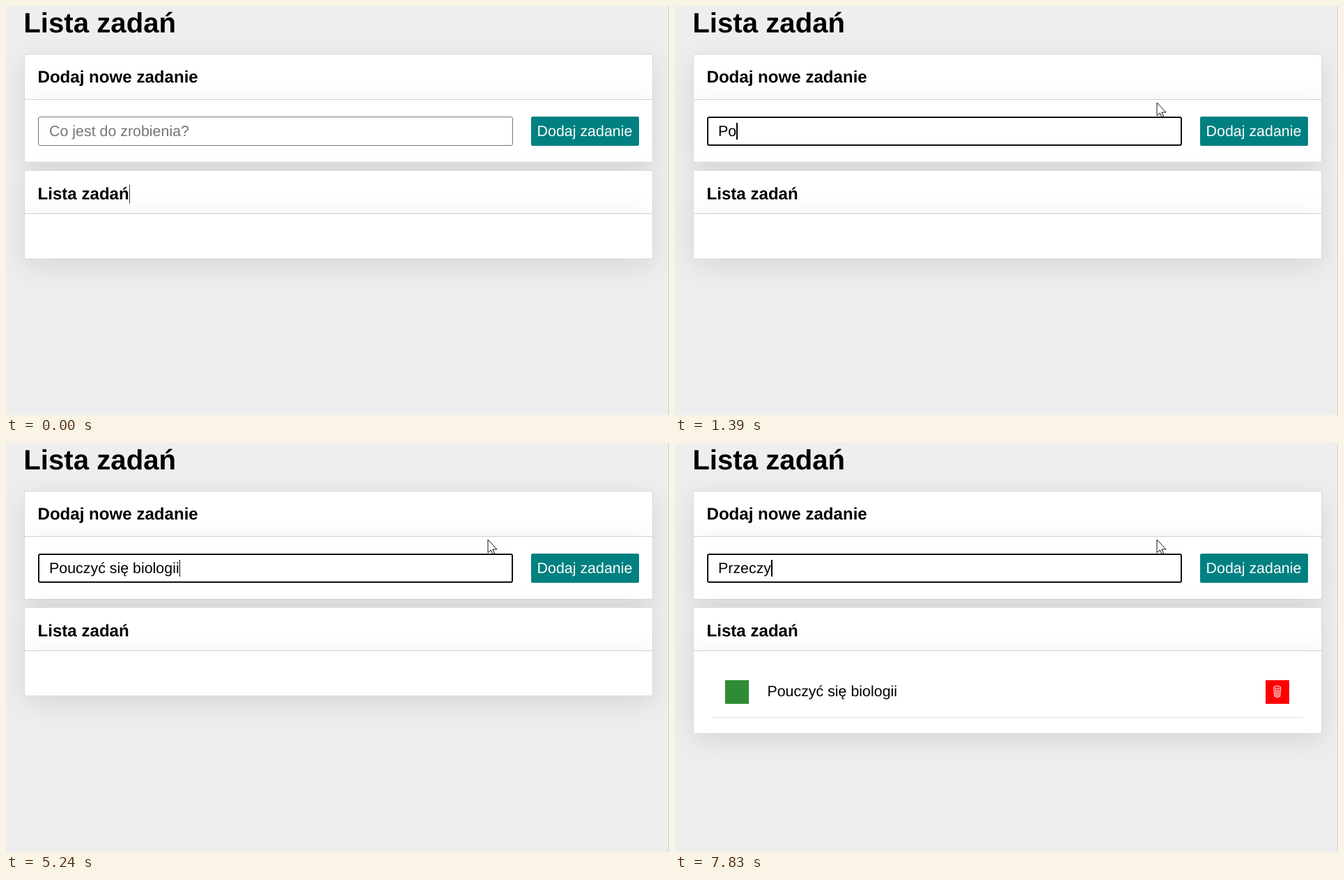
Write an HTML page that moves like this. It is 952 px wide and 588 px high and loops after 8000 ms.

```html
<!DOCTYPE html>
<html lang="pl">
<head>
<meta charset="utf-8">
<title>Lista zadań</title>
<style>
  html, body { margin: 0; width: 100%; height: 100%; overflow: hidden; }
  body {
    position: relative; background: #eee; color: #000;
    font: 21.4px/24px "Liberation Sans", Arial, sans-serif;
    text-rendering: geometricPrecision;
  }
  body *, svg { position: absolute; box-sizing: border-box; margin: 0; white-space: pre; }
  h1 { left: 25.3px; top: 2px; font-size: 40.2px; line-height: 45px; }
  h2 { left: 45.5px; font-size: 24.1px; line-height: 27px; }
  .box {
    left: 25.5px; width: 903.5px; background: #fff;
    border: 1px solid #dcdcdc; box-shadow: 0 10px 40px rgba(0, 0, 0, .1);
  }
  .head { border-bottom: 0; }
  .body { border-top: 1.5px solid #d0d0d0; }
  #field { left: 45.5px; top: 158.5px; width: 682px; height: 42.5px; border: 1px solid #767676; border-radius: 3px; background: #fff; }
  #field.focus { border: 2px solid #101010; }
  .line { left: 62px; top: 168px; }
  .line span { position: static; }
  #hint { color: #757575; }
  #caret { width: 1.5px; height: 24px; background: #000; }
  #button { left: 753.5px; top: 159px; width: 155px; height: 42px; border-radius: 2px; background: #008080; }
  #label { left: 762.6px; top: 168px; color: #fff; }
  #mark { left: 176.5px; top: 257px; width: 1.3px; height: 27px; background: #333; }
  #done { left: 72px; top: 341px; width: 34px; height: 33.5px; background: #2e8b36; }
  #task { left: 132.4px; top: 345px; }
  #bin { left: 848px; top: 341px; width: 34px; height: 33.5px; background: #f00; }
  #rule { left: 54px; top: 394px; width: 847px; height: 1px; background: #e2e2e2; }
  #edge { right: 0; top: 0; width: 1px; height: 100%; background: #cfcfcf; }
  svg { left: 0; top: 0; overflow: visible; }
</style>
</head>
<body>
  <h1>Lista zadań</h1>

  <div class="box head" style="top:69px;height:65px"></div>
  <div class="box body" style="top:134px;height:90.5px"></div>
  <div class="box head" style="top:236px;height:62px"></div>
  <div class="box body" id="list" style="top:297.5px"></div>

  <h2 style="top:89px">Dodaj nowe zadanie</h2>
  <div id="field"></div>
  <div class="line" id="hint">Co jest do zrobienia?</div>
  <div class="line"><span id="typed"></span><i id="caret"></i></div>
  <div id="button"></div>
  <div id="label">Dodaj zadanie</div>

  <h2 style="top:257px">Lista zadań</h2>
  <div id="mark"></div>

  <div id="item">
    <div id="done"></div>
    <div id="task">Pouczyć się biologii</div>
    <div id="bin">
      <svg width="34" height="34" fill="none" stroke="#fff" stroke-width="1">
        <ellipse cx="16.8" cy="10" rx="5" ry="1.7"/>
        <path d="M11.8 10.5 L13 23.5 Q16.8 25.5 20.6 23.5 L21.8 10.5 M14.3 13 L14.9 23 M16.8 13 V23.5 M19.3 13 L18.7 23"/>
      </svg>
    </div>
    <div id="rule"></div>
  </div>
  <div id="edge"></div>

  <svg width="952" height="588">
    <circle id="glow" cx="687" cy="176" r="14.5" fill="#ffff80" style="mix-blend-mode:multiply"/>
    <g id="pointer">
      <path id="arrow" d="M.5 .5 V19.3 L4.8 15.4 L7.5 21.2 L10 20.1 L7.4 14.4 H13.6 Z" fill="#fff" stroke="#111" stroke-width="1"/>
      <path id="beam" d="M-5 -9.5 H-1.5 L0 -8.5 L1.5 -9.5 H6 M0 -8.5 V8.5 M-5 9.5 H-1.5 L0 8.5 L1.5 9.5 H6" fill="none" stroke="#222" stroke-width="1.3"/>
    </g>
  </svg>

<script>
  const LOOP = 8000, FOCUS = 460, BLINK = 1060, ADDED = 5640;
  const FIRST = "Pouczyć się biologii", SECOND = "Przeczy";

  // [time, typed text]
  const typing = [[0, ""]];
  const type = (text, times, from = 1) =>
    times.forEach((t, i) => typing.push([t, text.slice(0, from + i)]));
  type(FIRST, [1230, 1390, 1720]);
  type(FIRST, [1915], 5);
  type(FIRST, [2110, 2570, 2780, 2940, 3100, 3370, 3570, 3770, 3930, 4090, 4250, 4450, 4920, 5080, 5240], 6);
  typing.push([ADDED, ""]);
  type(SECOND, [6170, 6500, 6735, 6970, 7205, 7440, 7830]);

  // [time, x, y, shape]
  const moves = [
    [0, 0, 0, ""],
    [120, 884, 190, "arrow"], [190, 850, 188, "arrow"], [260, 800, 184, "arrow"],
    [330, 740, 181, "arrow"], [390, 705, 178, "beam"], [460, 689, 177, "beam"],
    [600, 690, 171, "beam"], [660, 691, 148, "arrow"], [730, 691.5, 138.5, "arrow"]
  ];

  const $ = id => document.getElementById(id);
  const at = (steps, t) => steps.findLast(s => s[0] <= t);
  const show = (id, on) => { $(id).style.visibility = on ? "visible" : "hidden"; };

  function draw(t) {
    const text = at(typing, t)[1];
    const [, x, y, shape] = at(moves, t);
    const focused = t >= FOCUS, added = t >= ADDED;

    $("typed").textContent = text;
    $("field").className = focused ? "focus" : "";
    show("hint", !text);
    show("caret", focused && !(t >= BLINK && t < 1230));
    show("mark", !focused);
    show("item", added);
    $("list").style.height = added ? "120px" : "66.5px";

    $("pointer").setAttribute("transform", `translate(${x} ${y})`);
    show("arrow", shape === "arrow");
    show("beam", shape === "beam");
    show("glow", t >= FOCUS && t < 600);
  }

  function tick() {
    draw(performance.now() % LOOP);
    requestAnimationFrame(tick);
  }
  tick();
</script>
</body>
</html>
```
